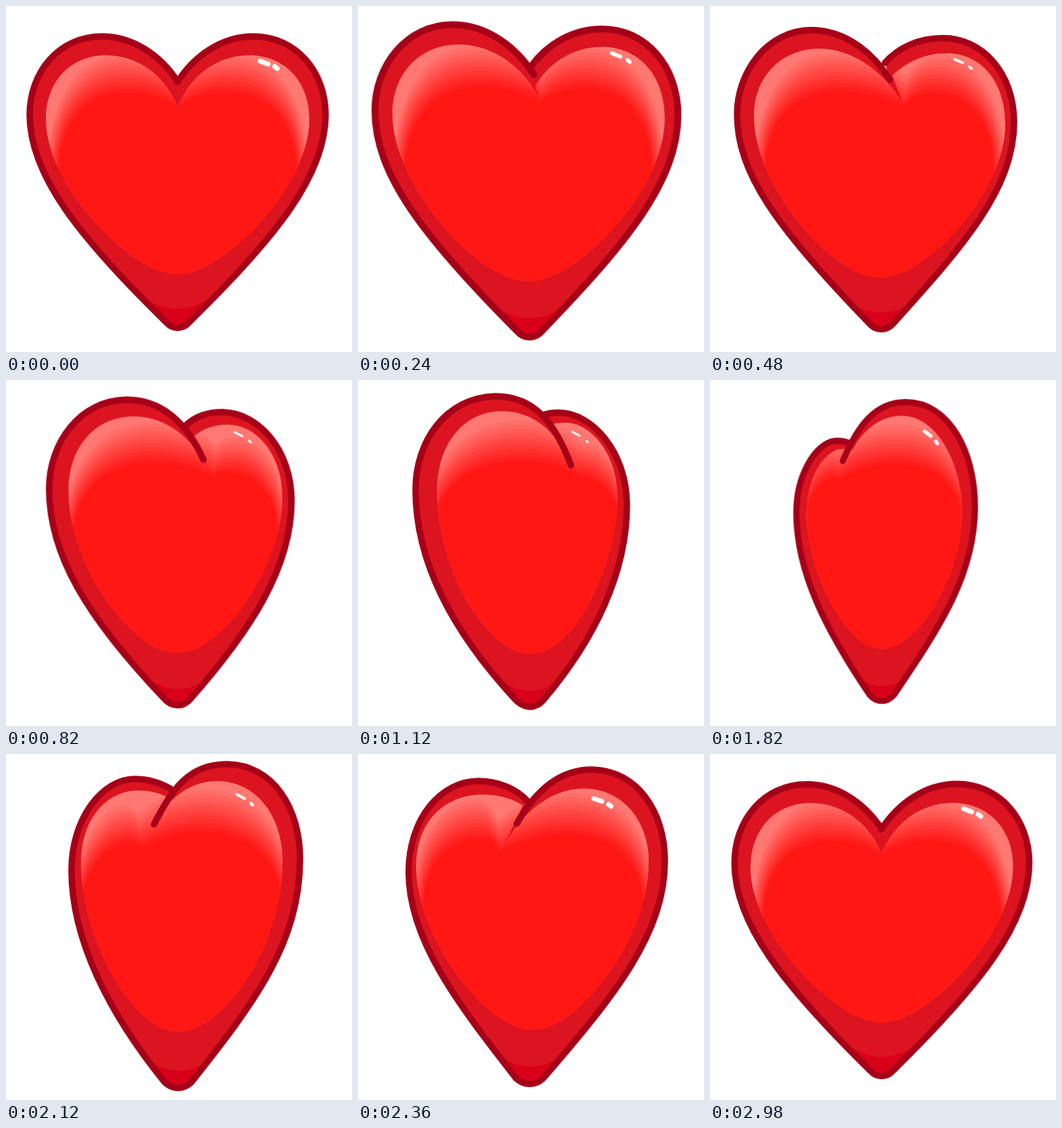
Animation of 512 by 512 pixels, one loop 3000 ms. Source, as an HTML page without scripts:

```html
<!DOCTYPE html>
<html lang="en">
<head>
<meta charset="utf-8">
<title>Beating heart</title>
<style>
html, body { margin: 0; width: 100%; height: 100%; overflow: hidden; background: #fff; }
svg { display: block; width: 100vw; height: 100vh; }
path { animation: 3s linear infinite; }

.beat { transform-origin: 254px 260px; animation: beat 3s ease-in-out infinite; }
.turn { transform-origin: 254px 0; animation: turn 3s step-end infinite; }
.body { animation-name: body; }
.rim { fill: none; stroke: #a50018; stroke-width: 9.5; stroke-linecap: round; stroke-linejoin: round; }
.tip { fill: #d90019; animation-name: tip; }
.face { animation-name: face; }
.glint { fill: none; stroke: #fff; stroke-linecap: round; animation-name: glint; }

/* stacked shades, each a little smaller and redder */
.shade {
  --k: calc(11 - var(--i));
  fill: #ff1714;
  opacity: calc(1 / (12 - var(--i)));
  transform-origin: 254px 240px;
  transform: scale(calc(1 + .01 * var(--k)), calc(1 + .05 * var(--k)));
  animation-name: shade;
}

@keyframes turn { 0% { transform: none } 50%, 100% { transform: scaleX(-1) } }

@keyframes beat {
  0%, 13%, 16%, 37.333%, 50%, 70.667%, 71.3%, 100% { transform: scale(1) }
  4.7% { transform: scale(1.087) }
  25% { transform: scale(.982) }
  32% { transform: scale(1.062) }
  41.3% { transform: scale(1.067) }
  63% { transform: scale(.947) }
  75% { transform: scale(.965) }
  78.667% { transform: scale(1) }
  81.7% { transform: scale(1.04) }
  89.5% { transform: scale(.974) }
}

@keyframes body {
  0%, 100% { d: path("M254 112 C230 75 190 45 142 45 C78 45 35 98 35 161 C35 250 108 342 237 468 C246 479 262 479 271 468 C400 342 473 250 473 161 C473 98 430 45 366 45 C318 45 278 75 254 112") }
  16% { d: path("M266 109 C245 75 205 36 150 35.5 C84 36 40 98 40 160 C40 245 95 325 236 470 C245 481 261 481 271 470 C375 355 450 270 450 172 C450 98 402 47.5 345 47.5 C308 47.5 278 62 259 84") }
  37.333% { d: path("M315 126 C292 65 262 24 203 24 C130 26 85 90 85 162 C85 270 140 372 232 472 C244 486 262 488 274 474 C350 385 398 285 398 185 C398 105 345 48 297 48 C288 48 280 49 273 52") }
  50% { d: path("M342 122 C322 60 290 27 254 27 C185 27 147 120 147 215 C147 300 185 370 235 466 C246 481 262 481 273 466 C323 370 361 300 361 215 C361 180 355 150 346 130 C344 126 343 124 342 122") }
  70.667% { d: path("M289 104 C262 52 238 15 181 15 C113 16 73 80 73 155 C73 280 142 370 234 486 C245 497 262 497 273 486 C355 385 411 275 411 172 C411 95 365 37 318 37 C298 37 278 43 262 53") }
  78.667% { d: path("M273 103 C250 62 215 23 162 23 C95 24 54 85 54 158 C54 265 126 355 234 480 C245 491 262 491 274 480 C360 370 433 275 433 175 C433 95 385 40 330 40 C300 40 272 52 256 71") }
}

@keyframes face {
  0%, 100% { d: path("M254 150 C238 108 200 73 148 73 C95 73 59 112 59 168 C59 265 185 397 254 397 C323 397 449 265 449 168 C449 112 413 73 360 73 C308 73 270 108 254 150 Z") }
  16% { d: path("M287 148 C265 108 220 63 160 63 C105 64 65 105 65 163 C65 265 180 402 252 402 C320 402 437 275 437 175 C437 110 400 70 350 70 C318 70 290 83 270 103 Z") }
  37.333% { d: path("M323 140 C302 90 270 46 212 46 C155 47 117 95 117 165 C117 280 190 405 256 405 C322 405 384 270 384 172 C384 110 345 63 308 63 C300 63 292 63 286 66 Z") }
  50% { d: path("M330 130 C312 75 287 44 252 44 C200 44 161 145 161 230 C161 300 210 398 254 398 C298 398 343 300 343 230 C343 195 340 160 333 138 C332 135 331 132 330 130 Z") }
  70.667% { d: path("M308 140 C285 85 250 40 195 40 C137 41 99 92 99 160 C99 280 185 411 253 411 C322 411 397 270 397 160 C397 95 358 54 313 54 C297 54 283 57 271 63 Z") }
  78.667% { d: path("M297 145 C270 90 225 51 173 51 C115 52 78 100 78 160 C78 270 180 408 250 408 C320 408 422 270 422 165 C422 100 380 60 323 60 C300 60 280 66 264 76 Z") }
}

@keyframes shade {
  0%, 100% { d: path("M254 150 C235 134 205 128 180 128 C120 128 78 170 78 250 V480 H430 V250 C430 170 388 128 328 128 C303 128 273 134 254 150") }
  16% { d: path("M287 148 C262 134 225 126 190 126 C130 126 82 165 82 250 V480 H420 V240 C420 170 380 129 330 129 C313 129 300 135 287 148") }
  37.333% { d: path("M323 140 C300 126 270 120 240 120 C180 120 130 150 117 195 V480 H384 V190 C375 165 355 148 340 144 C332 142 327 141 323 140") }
  50% { d: path("M330 145 C305 125 275 119 250 119 C215 119 180 132 163 165 V480 H343 V165 C340 158 336 152 333 148 C332 147 331 146 330 145") }
  70.667% { d: path("M308 139 C285 124 250 115 218 115 C155 115 110 150 102 205 V480 H394 V205 C385 160 350 131 325 131 C318 131 312 133 308 139") }
  78.667% { d: path("M297 145 C275 130 235 118 198 118 C140 118 88 150 86 225 V480 H411 V225 C411 160 370 125 325 125 C313 125 305 132 297 145") }
}

@keyframes tip {
  0%, 100% { d: path("M206 432 Q254 464 302 432 L271 468 Q254 480 237 468 Z") }
  16% { d: path("M203 435 Q252 472 304 436 L271 470 Q254 482 236 470 Z") }
  37.333% { d: path("M204 440 Q254 478 296 444 L274 474 Q254 486 232 472 Z") }
  50% { d: path("M224 446 Q254 470 284 446 L273 466 Q254 480 235 466 Z") }
  70.667% { d: path("M212 458 Q254 480 298 455 L273 486 Q254 497 234 486 Z") }
  78.667% { d: path("M206 447 Q254 478 300 447 L274 480 Q254 491 234 480 Z") }
}

@keyframes glint {
  0%, 100% { d: path("M376 81.5 L388 86 M397.5 89.5 L401.500 92.500"); stroke-width: 7px }
  16% { d: path("M362 79 L374 84 M384 90 L387 92.500"); stroke-width: 3.6px }
  37.333% { d: path("M317 76.500 L328 82.500 M338 90 L340 92"); stroke-width: 2.6px }
  50% { d: path("M298 73 L306 82 M312.500 92 L314 95.500"); stroke-width: 7px }
  70.667% { d: path("M342 60 L353 66 M362.500 73 L365 75.500"); stroke-width: 4.2px }
  78.667% { d: path("M349 66 L361 70 M370.500 74.500 L374.500 77.500"); stroke-width: 7px }
}
</style>
</head>
<body>
<svg viewBox="0 0 512 512">
  <defs>
    <clipPath id="mask"><path class="face"/></clipPath>
  </defs>
  <g class="beat">
    <g class="turn">
      <path class="body" fill="#dc1420"/>
      <path class="tip"/>
      <path class="face" fill="#ff7872"/>
      <g clip-path="url(#mask)">
        <path class="shade" style="--i:1"/>
        <path class="shade" style="--i:2"/>
        <path class="shade" style="--i:3"/>
        <path class="shade" style="--i:4"/>
        <path class="shade" style="--i:5"/>
        <path class="shade" style="--i:6"/>
        <path class="shade" style="--i:7"/>
        <path class="shade" style="--i:8"/>
        <path class="shade" style="--i:9"/>
        <path class="shade" style="--i:10"/>
        <path class="shade" style="--i:11"/>
      </g>
      <path class="body rim"/>
    </g>
    <path class="glint"/>
  </g>
</svg>
</body>
</html>
```
